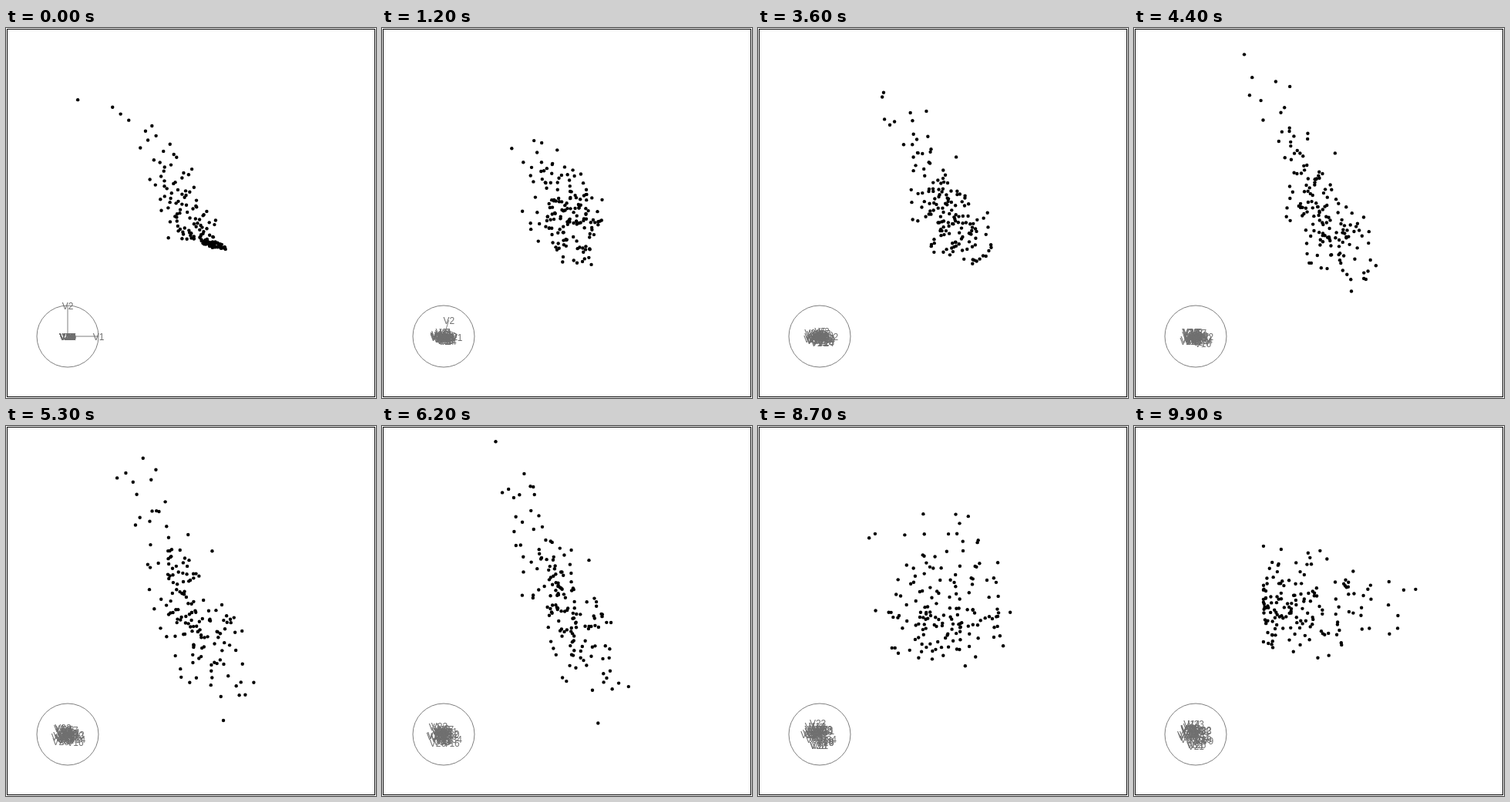
Write an HTML page that moves like this. It is 480 by 480 pixels and loops after 10 s.

```html
<!DOCTYPE html>
<html lang="en">
<head>
<meta charset="utf-8">
<title>Projection tour</title>
<style>
  html, body { margin: 0; width: 100%; height: 100%; overflow: hidden; background: #fff; }
  svg { display: block; width: 100vw; height: 100vh; }
  text { font: 12px "Liberation Sans", Arial, sans-serif; fill: #707070; text-anchor: middle; }
</style>
</head>
<body>
<svg viewBox="0 0 480 480">
  <rect x="1.5" y="1.5" width="477" height="477" fill="#fff" stroke="#000"/>
  <g id="dots"></g>
  <g fill="none" stroke="#7f7f7f">
    <circle cx="80" cy="400" r="40"/>
    <path id="axes"/>
  </g>
  <g id="labels"></g>
</svg>
<script>
const LOOP = 10000, STEP = 100;
const HUB = [80, 400], AXIS_COUNT = 34, AXIS_SPREAD = 7;
const FAN_COUNT = 102, CORE_COUNT = 58;

// Centre, spread, lean and skew of the cloud in each view after the opening one.
const VIEWS = [
  { time: 2300, cx: 239, cy: 232, sx: 29, sy: 42 },
  { time: 3600, cx: 243, cy: 232, sx: 22, sy: 47, lean: .42, skewY: -.18 },
  { time: 5300, cx: 237, cy: 232, sx: 24, sy: 70, lean: .38, skewY: -.1 },
  { time: 7100, cx: 235, cy: 225, sx: 21, sy: 60, lean: .38 },
  { time: 8700, cx: 238, cy: 235, sx: 38, sy: 45, skewY: -.12 },
  { time: 9900, cx: 216, cy: 235, sx: 41, sy: 32, skewX: .28 }
];
const TIMES = [0, ...VIEWS.map(view => view.time)];

let seed = 41;
function random() {
  seed = (seed + 0x6D2B79F5) | 0;
  let r = Math.imul(seed ^ (seed >>> 15), 1 | seed);
  r = (r + Math.imul(r ^ (r >>> 7), 61 | r)) ^ r;
  return ((r ^ (r >>> 14)) >>> 0) / 4294967296;
}

// Unit spread, never beyond about 2.4.
const bell = () => Math.sqrt(6) * (random() + random() - 1);
const skewed = (v, skew = 0) => v + skew * (v * v - 1);

// Turns two independent coordinates into one that drifts from view to view.
const blend = (a, b, view) => a * Math.cos(view * .45) + b * Math.sin(view * .45);

function cloudPath(start, a, b) {
  const c = bell(), d = bell();
  return [start, ...VIEWS.map((s, view) => {
    const dy = s.sy * skewed(blend(a, c, view), s.skewY);
    const dx = s.sx * skewed(blend(b, d, view), s.skewX);
    return [s.cx + (s.lean || 0) * dy + dx, s.cy + dy];
  })];
}

// Opening view: a fan of dots rising to the left out of a tight core.
function fanDot(_, i) {
  const u = (i + .5) / FAN_COUNT, b = bell();
  const rise = 110 * u ** 1.5 + 76 * u ** 12;
  const x = 245 - .33 * rise - 100 * u ** 40 + 18 * b;
  return cloudPath([x, 274 - rise], .7 * bell() - 2.4 * (u - .5), b);
}

function coreDot() {
  const a = bell(), b = bell();
  return cloudPath([269 + 7.5 * a, 281 + 2 * a + 2 * b], a, b);
}

function axisPath(n) {
  const start = n === 1 ? [120, 400] : n === 2 ? [80, 360] : HUB;
  const [a, b, c, d] = [bell(), bell(), bell(), bell()];
  return [start, ...VIEWS.map((_, view) => [
    HUB[0] + AXIS_SPREAD * blend(a, c, view),
    HUB[1] + AXIS_SPREAD * blend(b, d, view)
  ])];
}

function slope(path, k, axis) {
  const lo = Math.max(k - 1, 0), hi = Math.min(k + 1, TIMES.length - 1);
  return (path[hi][axis] - path[lo][axis]) / (TIMES[hi] - TIMES[lo]);
}

// Smooth curve through the views.
function along(path, time) {
  let k = 0;
  while (k < TIMES.length - 2 && time >= TIMES[k + 1]) k++;
  const span = TIMES[k + 1] - TIMES[k], s = (time - TIMES[k]) / span, r = 1 - s;
  return [0, 1].map(axis =>
    r * r * (1 + 2 * s) * path[k][axis] + s * s * (3 - 2 * s) * path[k + 1][axis] +
    span * s * r * (r * slope(path, k, axis) - s * slope(path, k + 1, axis)));
}

function add(parent, tag, attrs, content = "") {
  const el = document.createElementNS("http://www.w3.org/2000/svg", tag);
  for (const name in attrs) el.setAttribute(name, attrs[name]);
  el.textContent = content;
  return document.getElementById(parent).appendChild(el);
}

const dots = [
  ...Array.from({ length: FAN_COUNT }, fanDot),
  ...Array.from({ length: CORE_COUNT }, coreDot)
].map(path => ({ path, el: add("dots", "circle", { r: 2.2 }) }));

const axes = Array.from({ length: AXIS_COUNT }, (_, i) => ({
  path: axisPath(i + 1),
  el: add("labels", "text", {}, "V" + (i + 1))
}));
const axisLines = document.getElementById("axes");

function draw(time) {
  for (const { path, el } of dots) {
    const [x, y] = along(path, time);
    el.setAttribute("cx", x.toFixed(2));
    el.setAttribute("cy", y.toFixed(2));
  }
  let lines = "";
  for (const { path, el } of axes) {
    const [x, y] = along(path, time);
    el.setAttribute("x", x.toFixed(2));
    el.setAttribute("y", (y + 4.6).toFixed(2));
    lines += `M${HUB}L${x.toFixed(2)},${y.toFixed(2)}`;
  }
  axisLines.setAttribute("d", lines);
}

const begin = performance.now();
function tick() {
  const time = (performance.now() - begin) % LOOP;
  draw(Math.floor(time / STEP) * STEP);
  requestAnimationFrame(tick);
}
draw(0);
requestAnimationFrame(tick);
</script>
</body>
</html>
```
